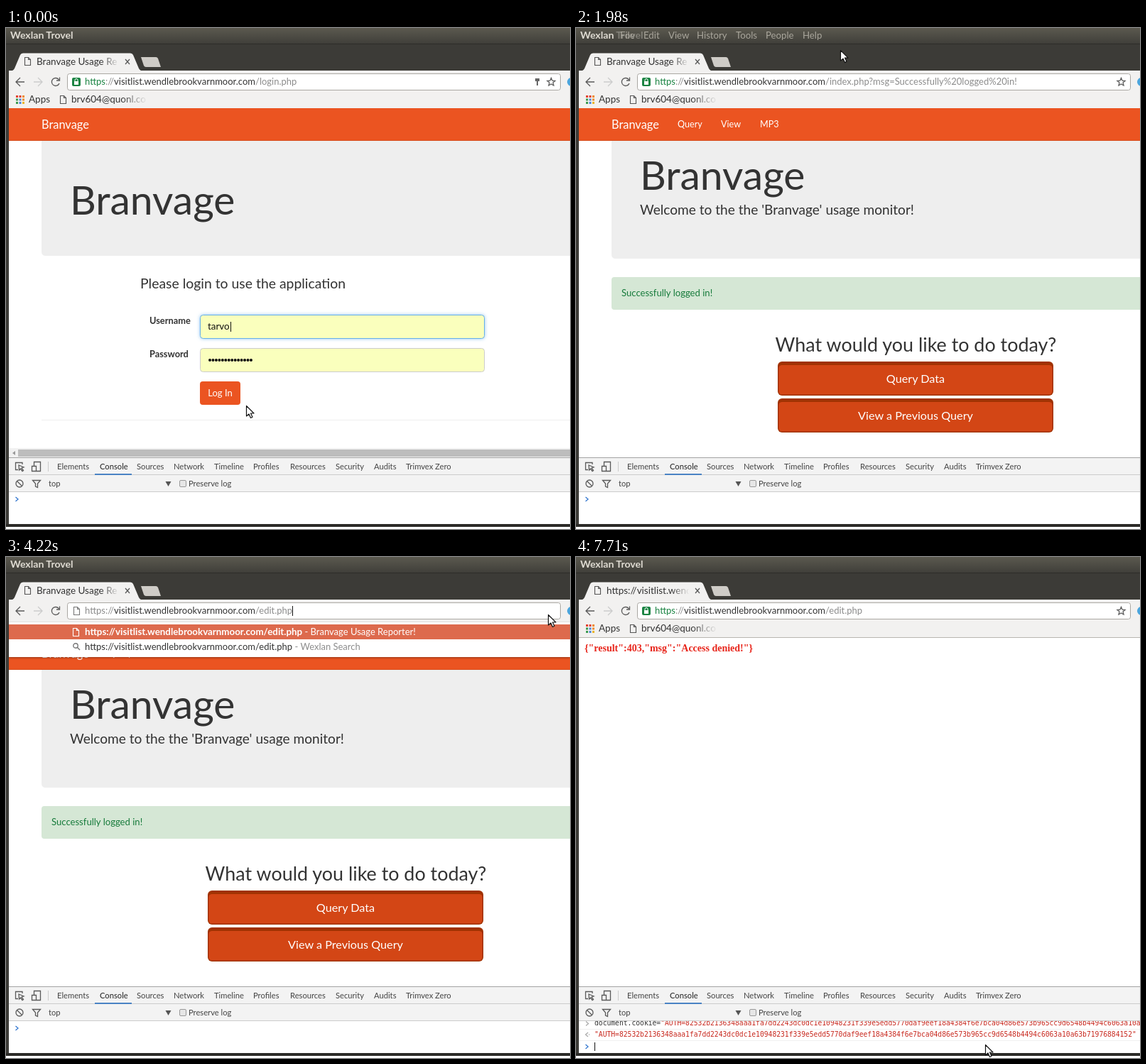
These frames come from a looping animation (794 by 706 pixels, 8000 ms). An HTML page:

```html
<!DOCTYPE html>
<html lang="en">
<head>
<meta charset="utf-8">
<title>Login walkthrough</title>
<style>
  html, body { margin: 0; width: 100%; height: 100%; overflow: hidden; background: #fff; }
  svg { display: block; font: 13px Lato, "Noto Sans", sans-serif; fill: #333; }
  .line { fill: none; stroke: #5a5a5a; stroke-width: 1.3; }
  .bold { font-weight: 700; }
  .mid { text-anchor: middle; }
  .light { fill: #fff; }
  .dim { fill: #8c8c8c; }
  .dev { font-size: 11.2px; fill: #444; }
  .mono { font: 9.69px "DejaVu Sans Mono", monospace; }
  .str { fill: #c8281e; }
  .menu { font-size: 13.2px; fill: #c9c5ba; }
  .h1 { font-size: 57px; }
  #dropdown .bold { font-size: 13.35px; }
</style>
</head>
<body>
<svg width="794" height="706" viewBox="0 0 794 706">
  <defs>
    <linearGradient id="titleFill" x2="0" y2="1">
      <stop stop-color="#5b594f"/><stop offset="1" stop-color="#403f3a"/>
    </linearGradient>
    <linearGradient id="fade">
      <stop stop-color="#f2f1f0" stop-opacity="0"/><stop offset=".85" stop-color="#f2f1f0"/>
    </linearGradient>
    <filter id="shadow" x="-5%" y="-5%" width="110%" height="120%">
      <feDropShadow dx="0" dy="1" stdDeviation="1.5" flood-opacity=".4"/>
    </filter>
    <filter id="glow" x="-5%" y="-30%" width="110%" height="160%">
      <feDropShadow dx="0" dy="0" stdDeviation="2.5" flood-color="#66afe9" flood-opacity=".7"/>
    </filter>
    <clipPath id="consoleClip"><rect x="4" y="654" width="790" height="45"/></clipPath>
    <path id="doc" d="M.5 .5H5.5L8.5 3.5V11.5H.5ZM5.5 .5V3.5H8.5" fill="none" stroke-width="1.1"/>
    <g id="lens" fill="none" stroke="#777" stroke-width="1.4"><circle cx="4" cy="4" r="3.2"/><path d="M6.5 6.5L10 10"/></g>
    <g id="bigButton">
      <rect width="388" height="48" rx="6" fill="#a03202"/>
      <rect x="1.500" y="5" width="385" height="41.500" rx="4.500" fill="#d34615"/>
    </g>
  </defs>

  <!-- Window chrome -->
  <rect width="794" height="703" fill="#3c3b37"/>
  <rect width="794" height="22" fill="url(#titleFill)"/>
  <path d="M0 22.5H794" stroke="#2d2c29"/>
  <g class="bold" font-size="14.1" fill="#dfdbd2">
    <text x="6" y="15">Wexlan <tspan id="titleEnd">Trovel</tspan></text>
  </g>
  <g id="menu" class="menu">
    <text x="62" y="15">File</text><text x="95" y="15">Edit</text><text x="130" y="15">View</text>
    <text x="170" y="15">History</text><text x="225" y="15">Tools</text><text x="267" y="15">People</text>
    <text x="319" y="15">Help</text>
  </g>
  <path d="M9 60Q11 59 12 57L20 38Q21 35.500 24 35.500H175Q178 35.500 179 38L187 57Q188 59 190 60Z" fill="#f2f1f0"/>
  <path d="M190 41H211Q213 41 214 43L218 55H197Q195 55 194 53Z" fill="#cfccc7"/>
  <use href="#doc" x="26" y="41" stroke="#555"/>
  <text id="tabTitle" x="43" y="52" font-size="13.5"></text>
  <rect x="134" y="38" width="30" height="20" fill="url(#fade)"/>
  <path d="M168 44L174 51M174 44L168 51" class="line"/>
  <rect x="4" y="60" width="790" height="54" fill="#f2f1f0"/>
  <path d="M26 76H14M20 70L14 76L20 82" class="line" stroke-width="1.8"/>
  <path d="M39 76H51M45 70L51 76L45 82" class="line" style="stroke:#ccc"/>
  <path id="reload" d="M74.5 73A5.5 5.5 0 1 0 75 78M75.500 69.500V74H71" class="line"/>
  <path id="stop" d="M65 71L75 81M75 71L65 81" class="line"/>
  <rect x="86.500" y="64.500" width="694" height="23" rx="3" fill="#fff" stroke="#aaa7a2"/>
  <circle cx="796" cy="76" r="6" fill="#4aa5dd"/>
  <g id="lock">
    <rect x="93" y="70" width="12" height="12" rx="2" fill="#1b8443"/>
    <rect x="96" y="75" width="6" height="5" fill="#fff"/>
    <path d="M97 75V73.500A2 2 0 0 1 101 73.500V75" fill="none" stroke="#fff"/>
    <path d="M767.500 70.500L769.100 74.200L773 74.500L770 77L771 81L767.500 78.900L764 81L765 77L762 74.500L765.900 74.200Z" class="line"/>
  </g>
  <path id="key" d="M745 71H751V75H749V81H747V75H745Z" fill="#666"/>
  <use id="editIcon" href="#doc" x="95" y="70" stroke="#777"/>
  <rect id="selection" y="67" height="17" fill="#f07746"/>
  <text id="url" x="111" y="80"><tspan id="scheme">https</tspan><tspan class="dim">://</tspan><tspan id="domain"></tspan><tspan id="typed" class="dim"></tspan><tspan id="selected" class="light"></tspan><tspan id="rest" class="dim"></tspan></text>
  <path id="urlCaret" d="M0 69V83" stroke="#111"/>
  <g id="apps"></g>
  <text x="32" y="105" font-size="13.5">Apps</text>
  <use href="#doc" x="76" y="95" stroke="#555"/>
  <text x="92" y="105" font-size="13.5">brv604@quonl.co</text>
  <rect x="163" y="92" width="42" height="18" fill="url(#fade)"/>
  <path d="M4 113.500H794" stroke="#b8b5b0"/>

  <!-- Page -->
  <rect x="4" y="114" width="790" height="492" fill="#fff"/>
  <g id="site">
    <rect x="4" y="113" width="790" height="46" fill="#eb5421"/>
    <path d="M4 158.500H794" stroke="#d64b1a"/>
    <text x="50" y="142" font-size="16.4" class="light">Branvage</text>
  </g>
  <g id="login">
    <path d="M50 159H794V321H56Q50 321 50 315Z" fill="#eee"/>
    <text x="90" y="263" class="h1">Branvage</text>
    <text x="189" y="367" font-size="19.4">Please login to use the application</text>
    <g class="bold" font-size="12.8"><text x="202" y="417">Username</text><text x="202" y="464">Password</text></g>
    <rect x="273.500" y="404.500" width="400" height="33" rx="4" fill="#faffbd" stroke="#66afe9" filter="url(#glow)"/>
    <rect x="273.500" y="451.500" width="400" height="33" rx="4" fill="#faffbd" stroke="#ccc"/>
    <text x="284" y="425" font-size="13.4" fill="#111">tarvo</text>
    <path id="userCaret" d="M316.500 414V428" stroke="#111"/>
    <path d="M287 468H346" stroke="#111" stroke-width="4" stroke-linecap="round" stroke-dasharray="0 4.460"/>
    <rect id="button" x="273" y="498" width="57" height="33" rx="4"/>
    <text x="301.500" y="519" class="mid light">Log In</text>
    <path d="M50 552.500H794" stroke="#eee"/>
    <rect x="4" y="592" width="790" height="13" fill="#f1f1f1"/>
    <rect id="thumb" x="17" y="594" width="777" height="10"/>
    <path d="M13 596V602L9 599Z" fill="#999"/>
  </g>
  <g id="home">
    <g class="light" font-size="12.6"><text x="143" y="140">Query</text><text x="204" y="140">View</text><text x="259" y="140">MP3</text></g>
    <path d="M50 159H794V325H56Q50 325 50 319Z" fill="#eee"/>
    <text x="90" y="228" class="h1">Branvage</text>
    <text x="90" y="263" font-size="19.1">Welcome to the the 'Branvage' usage monitor!</text>
    <rect x="50" y="351" width="760" height="46" rx="4" fill="#d5e7d5"/>
    <text x="64" y="378" font-size="13.1" fill="#157a3a">Successfully logged in!</text>
    <text x="478.500" y="456" font-size="26.900" class="mid">What would you like to do today?</text>
    <use href="#bigButton" x="284" y="470"/><use href="#bigButton" x="284" y="522"/>
    <g class="mid light" font-size="16.2"><text x="478" y="500">Query Data</text><text x="478" y="552">View a Previous Query</text></g>
  </g>
  <text id="denied" x="12" y="133" fill="#e8261c" style="font:bold 14px 'Liberation Serif',serif">{"result":403,"msg":"Access denied!"}</text>
  <g id="dropdown"></g>

  <!-- Developer tools -->
  <rect x="4" y="605" width="790" height="49" fill="#f3f3f3"/>
  <rect x="4" y="654" width="790" height="45" fill="#fff"/>
  <path d="M4 605.500H794" stroke="#a3a3a3"/>
  <path d="M4 629.500H794M4 653.500H794M59.500 611V625" stroke="#ccc"/>
  <path d="M23 615V612.500H13.500V622.500H17M18 616L25 619L22 620L24.500 623.500L23 624.500L20.500 621L18.500 623Z" class="line"/>
  <path d="M39.500 618V611.500H48.500V624.500H43M36.500 617.500H42.500V624.500H36.500Z" class="line"/>
  <g class="dev">
    <text x="72" y="622">Elements</text><text x="132" y="622" fill="#222">Console</text><text x="184" y="622">Sources</text>
    <text x="236" y="622">Network</text><text x="293" y="622">Timeline</text><text x="348" y="622">Profiles</text>
    <text x="400" y="622">Resources</text><text x="464" y="622">Security</text><text x="518" y="622">Audits</text>
    <text x="563" y="622">Trimvex Zero</text>
    <text id="context" x="60" y="646">top</text><text x="257" y="646">Preserve log</text>
  </g>
  <path d="M125 629H177" stroke="#4a83c4" stroke-width="2"/>
  <circle cx="19" cy="642" r="5" class="line"/><path d="M15.500 638.500L22.500 645.500" class="line"/>
  <path d="M37.500 637.500H48.500L44.500 642V647.500L41.500 646V642Z" class="line"/>
  <path d="M224.500 639H232.500L228.500 646Z" fill="#555"/>
  <rect x="244.500" y="637.500" width="9" height="9" rx="1.5" fill="#e6e6e6" stroke="#999"/>
  <g clip-path="url(#consoleClip)">
    <g id="result" class="mono">
      <path d="M14 654.500L17.500 657.500L14 660.500" class="line" style="stroke:#aaa"/>
      <path d="M17 670L13.500 673L17 676M18 673H19" class="line" style="stroke:#aaa"/>
      <path d="M4 665.500H794M4 681.500H794" stroke="#f0f0f0"/>
      <text x="26" y="660">document.cookie=<tspan class="str token"></tspan></text>
      <text x="26" y="676" class="str token"></text>
    </g>
    <g id="prompt">
      <path d="M13.500 661L17 664L13.500 667" class="line" style="stroke:#3679d0"/>
      <text x="26" y="667.500" class="mono"><tspan id="command"></tspan><tspan id="value" class="str"></tspan></text>
      <path id="consoleCaret" d="M.5 658V670" stroke="#111"/>
    </g>
  </g>
  <g id="popup" class="mono">
    <rect x="23.500" y="612.500" width="356" height="43" fill="#fff" stroke="#aaa"/>
    <rect id="pick" x="24" y="613" width="355" height="14" fill="#3879d9"/>
    <text id="suggestion" x="26" y="623.500"></text><text x="26" y="637.500">document</text><text x="26" y="651.500">documentURI</text>
  </g>
  <path d="M0 701H794" stroke="#2c2b28" stroke-width="4"/>
  <rect y="703" width="794" height="3" fill="#fff"/>

  <g id="pointer" fill="#fff" stroke="#111" stroke-width="1.2" stroke-linejoin="round">
    <path id="arrow" d="M.5 .5V15L4 12L6.500 17.500L9 16.300L6.500 11H11Z"/>
    <path id="hand" d="M2 1Q3.500 0 4.500 2V6L11 7Q13 8 12 11L11 14H4L-1 8.500Q-1 7 2 8Z"/>
  </g>
</svg>
<script>
const LOOP = 8000;
const SITE = "visitlist.wendlebrookvarnmoor.com";
const BASE = "https://" + SITE + "/";
const INDEX = "index.php?msg=Successfully logged ";
const REPORTER = " - Branvage Usage Reporter!";
const TOKEN = '"AUTH=82532b2136348aaa1fa7dd2243dc0dc1e10948231f339e5edd5770daf9eef18a4384f6e7bca04d86e573b965cc9d6548b4494c6063a10a63b71976884152"';
const LOGIN_CLICK = 920, HOME = 1250, DRAG = 2440, EDIT = 2960, ENTER = 4450, DENIED = 4700, RUN = 7710;

const typing = [[EDIT, "i"], [3180, ""], [3260, "e"], [3360, "ed"], [3460, "edi"], [3560, "edit"],
  [3900, "edit."], [4000, "edit.p"], [4110, "edit.ph"], [4220, "edit.php"]];
const commands = [[0, ""], [6070, "d"], [6120, "do"], [6180, "doc"], [6230, "docu"], [6470, "document.cookie="], [RUN, ""]];
// time, x, y
const path = [[50, 338, 532], [240, 348, 575], [400, 328, 596], [600, 293, 552], [740, 281, 528], [1150, 281, 528],
  [1400, 325, 290], [1700, 366, 38], [1820, 371, 17], [1980, 372, 31], [2300, 362, 60], [DRAG, 361, 63],
  [2800, 763, 81], [4650, 763, 81], [5150, 574, 302], [5270, 562, 345], [5380, 547, 450], [5560, 611, 625], [5730, 576, 687]];

const $ = id => document.getElementById(id);
const show = (id, on) => $(id).style.display = on ? "" : "none";
const put = (id, text) => { if ($(id).textContent !== text) $(id).textContent = text; };
const clamp = v => Math.max(0, Math.min(1, v));
const latest = (steps, t) => steps.filter(s => s[0] <= t).pop()[1];

function pointerAt(t) {
  const i = path.findIndex(p => p[0] > t);
  if (i < 1) return (i ? path[path.length - 1] : path[0]).slice(1);
  const [a, b] = [path[i - 1], path[i]];
  const k = (t - a[0]) / (b[0] - a[0]);
  return [1, 2].map(n => a[n] + (b[n] - a[n]) * k);
}

function suggestions(text) {
  const bold = s => `<tspan class="bold">${s}</tspan>`;
  const grey = s => `<tspan class="dim">${s}</tspan>`;
  const match = page => bold(BASE + text) + page.slice(text.length);
  const search = ["lens", BASE + text + grey(" - Wexlan Search")];
  if (text[0] === "e") return [["doc", match("edit.php") + REPORTER], search];
  const rows = [["doc", bold(BASE + text)],
    ["doc", match(INDEX) + (text ? bold("i") : "i") + "n!"],
    search,
    ["doc", match(INDEX) + "out!" + grey(REPORTER)]];
  if (!text) rows.push(["doc", match("edit.php") + grey(REPORTER)]);
  return rows;
}

let shownText = null;
function drawDropdown(text) {
  if (text === shownText) return;
  shownText = text;
  const rows = suggestions(text);
  $("dropdown").innerHTML =
    `<rect x="4" y="92" width="790" height="${7 + 21 * rows.length}" fill="#fff" filter="url(#shadow)"/>
     <rect x="4" y="95" width="790" height="21" fill="#dd6a4d"/>` +
    rows.map(([icon, html], i) =>
      `<use href="#${icon}" x="94" y="${100 + 21 * i}" stroke="${i ? "#777" : "#fff"}"/>
       <text x="111" y="${110 + 21 * i}" fill="${i ? "#333" : "#fff"}">${html}</text>`).join("");
}

function drawUrl(t, pointerX) {
  const editing = t >= EDIT && t < ENTER;
  let typed = t < HOME ? "/login.php" : "/edit.php", selected = "", rest = "";
  if (t >= HOME && t < EDIT) {
    const full = "/index.php?msg=Successfully%20logged%20in!";
    const count = t < DRAG ? 0 : Math.round((full.length - 2) * clamp((pointerX - 361) / 257));
    typed = full.slice(0, 2);
    selected = full.slice(2, 2 + count);
    rest = full.slice(2 + count);
  } else if (editing) {
    const text = latest(typing, t);
    typed = "/" + text;
    if (text[0] === "e") selected = "edit.php".slice(text.length);
    drawDropdown(text);
  }
  put("typed", typed); put("selected", selected); put("rest", rest);
  $("scheme").setAttribute("fill", editing ? "#8c8c8c" : "#1b8443");
  show("dropdown", editing); show("editIcon", editing); show("lock", !editing);
  const start = BASE.length - 1 + typed.length;
  const x = 111 + $("url").getSubStringLength(0, start);
  show("urlCaret", editing && !selected);
  $("urlCaret").setAttribute("transform", `translate(${Math.round(x) + .5})`);
  $("selection").setAttribute("x", x);
  $("selection").setAttribute("width", selected ? $("url").getSubStringLength(start, selected.length) : 0);
}

function drawConsole(t) {
  const command = latest(commands, t), pasted = t >= 6470 && t < RUN;
  put("command", command);
  put("value", pasted ? TOKEN : "");
  show("popup", t >= 6070 && t < 6740);
  show("pick", pasted);
  $("suggestion").setAttribute("fill", pasted ? "#fff" : "#333");
  show("result", t >= RUN);
  show("consoleCaret", t >= 5900 && !pasted);
  $("consoleCaret").setAttribute("transform", `translate(${26 + Math.round(command.length * 5.83)})`);
  $("prompt").setAttribute("transform", `translate(0 ${t >= RUN ? 26 : 0})`);
}

function draw(t) {
  const [x, y] = pointerAt(t), hand = t >= 680 && t < 1180;
  $("pointer").setAttribute("transform", `translate(${x} ${y})`);
  show("hand", hand); show("arrow", !hand);

  show("login", t < HOME); show("key", t < HOME);
  show("home", t >= HOME && t < DENIED);
  show("site", t < DENIED); show("denied", t >= DENIED);
  put("tabTitle", t < DENIED ? "Branvage Usage Re" : "https://visitlist.wend");
  show("userCaret", t < 450);
  $("button").setAttribute("fill", t >= LOGIN_CLICK ? "#9c3003" : hand ? "#c34113" : "#eb5421");
  $("button").setAttribute("stroke", t >= LOGIN_CLICK ? "#6b5a52" : "none");
  $("thumb").setAttribute("fill", y > 590 ? "#a0a0a0" : "#bdbdbd");

  const loading = (t >= 1000 && t < HOME) || (t >= ENTER && t < DENIED);
  show("stop", loading); show("reload", !loading);
  show("context", !(t >= HOME - 80 && t < HOME) && !(t >= DENIED - 80 && t < DENIED));

  const menu = Math.min(clamp((t - 1740) / 130), clamp((2160 - t) / 240));
  $("menu").setAttribute("opacity", menu);
  $("titleEnd").setAttribute("fill-opacity", 1 - menu * .85);

  drawUrl(t, x);
  drawConsole(t);
}

put("domain", SITE);
put("suggestion", "document.cookie=" + TOKEN.slice(0, 44));
document.querySelectorAll(".token").forEach(e => e.textContent = TOKEN);
const dots = ["#e2402f", "#e2402f", "#ef8b2c", "#3b9b50", "#4c86d8", "#ef8b2c", "#3b9b50", "#4c86d8", "#e8b52c"];
$("apps").innerHTML = dots.map((c, i) =>
  `<rect x="${14 + i % 3 * 4.5}" y="${95 + Math.floor(i / 3) * 4.5}" width="3" height="3" fill="${c}"/>`).join("");

function tick() {
  draw(performance.now() % LOOP);
  requestAnimationFrame(tick);
}
tick();
</script>
</body>
</html>
```
